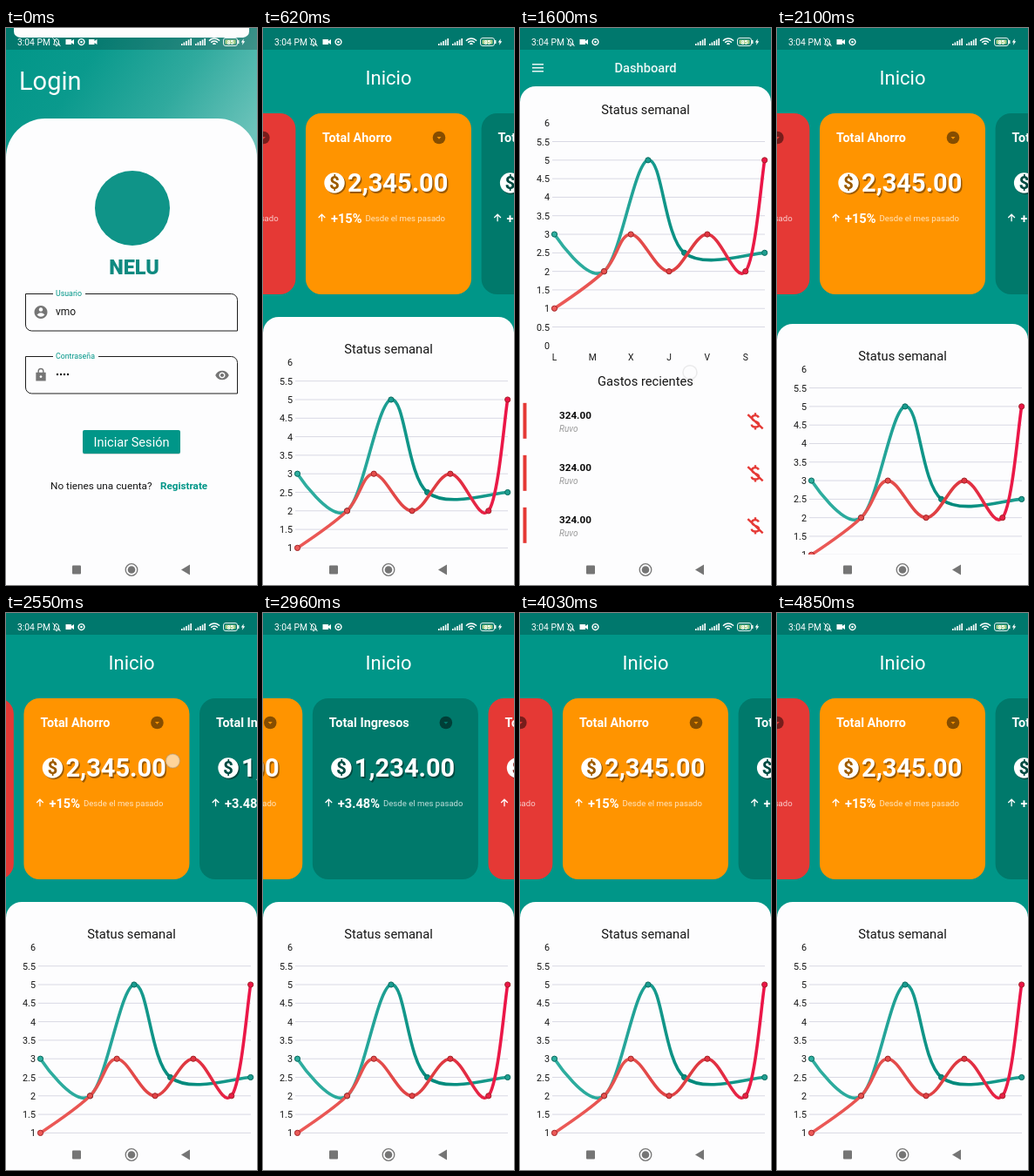
Write an HTML page with a canvas that moves like this. It is 288x640 px and loops after 4890 ms.

```html
<!DOCTYPE html>
<html lang="es">
<head>
<meta charset="utf-8">
<title>Control de gastos</title>
<style>
html, body { margin: 0; width: 100%; height: 100%; overflow: hidden; background: #fff; }
canvas { display: block; width: 288px; height: 640px; }
</style>
</head>
<body>
<canvas id="stage"></canvas>
<script>
const W = 288, H = 640, LOOP = 4890;
const TEAL = '#009688', DARK = '#00786d', RED = '#e53935';
const PAPER = '#fdfdfe', GREY = '#757575', INK = '#151515';
const canvas = document.getElementById('stage');
const ctx = canvas.getContext('2d');
const ratio = window.devicePixelRatio || 1;
canvas.width = W * ratio;
canvas.height = H * ratio;

const clamp = (v, lo = 0, hi = 1) => Math.min(hi, Math.max(lo, v));
const linear = p => p;
const easeOut = p => 1 - (1 - p) ** 2;

// Each key is [time, value, easing towards that value].
function track(keys, t) {
  if (t <= keys[0][0]) return keys[0][1];
  for (let i = 1; i < keys.length; i++) {
    const [t0, v0] = keys[i - 1], [t1, v1, ease = linear] = keys[i];
    if (t <= t1) return v0 + (v1 - v0) * ease((t - t0) / (t1 - t0));
  }
  return keys[keys.length - 1][1];
}

const ENTER = [[380, H], [620, 0, easeOut]];
const SCROLL = [[850, 0], [1000, 144], [1300, 276, easeOut], [1600, 276], [1800, 110],
  [2060, -14, easeOut], [2224, 0, easeOut]];
const PAGE = [[2500, 0], [2680, .5], [3070, 1, easeOut], [3100, 1], [3200, 1.5],
  [3390, 2, easeOut], [3400, 2], [3500, 2.36], [3850, 3, easeOut]];

// start, end, x and y from, x and y to
const TOUCHES = [
  [850, 1000, 200, 480, 200, 336],
  [1590, 1800, 195, 387, 195, 553],
  [2500, 2680, 220, 170, 119, 170],
  [3100, 3200, 215, 150, 114, 150],
  [3400, 3500, 202, 143, 130, 143]
];

const CARDS = [
  { title: 'Total Ahorro', amount: '2,345.00', change: '+15%', color: '#ff9400' },
  { title: 'Total Ingresos', amount: '1,234.00', change: '+3.48%', color: '#00796b' },
  { title: 'Total Gastos', amount: '987.56', change: '-3.48%', color: RED }
];

const LINES = [
  { points: [[0, 3], [1.3, 2], [2.45, 5], [3.4, 2.5], [5.5, 2.5]],
    colors: ['#2fae9f', '#26a69a', '#00897b', '#1f9f91'], edge: '#0b6b60' },
  { points: [[0, 1], [1.3, 2], [2, 3], [3, 2], [4, 3], [5, 2], [5.5, 5]],
    colors: ['#ec5a58', '#e5504d', '#de3b40', '#ec1448'], edge: '#a3262a' }
];

const ICONS = {
  account: 'M12 2a10 10 0 1 0 .01 0z M12 5a3 3 0 1 1-.01 0z M6 16q6-6 12 0q-6 6-12 0z',
  lock: 'M4 8h16v14h-16z M12 13a2 2 0 1 1-.01 0z M7 8V6a5 5 0 0 1 10 0v2h-2V6a3 3 0 0 0-6 0v2z',
  eye: 'M1 12C5 2 19 2 23 12C19 22 5 22 1 12z M12 7a5 5 0 1 1-.01 0z M12 9a3 3 0 1 1-.01 0z',
  noMoney: 'M16 7.5Q15 5 12 5Q8 5 8 8Q8 10.5 12 12Q16.3 13.3 16.3 16Q16.3 19 12 19Q8 19 7.5 16M12 2V5M12 19V22M3 4L21 21',
  up: 'M12 20V5M5 12L12 5L19 12',
  bell: 'M5 18H19L17 15V10Q16 5 12 5Q8 5 7 10V15L5 18M10 21H14M3 3L21 22',
  video: 'M2 6h13v4l6-4v12l-6-4v4h-13z',
  gear: 'M12 3a9 9 0 1 0 .01 0z M12 6a6 6 0 1 1-.01 0z M12 9a3 3 0 1 0 .01 0z',
  bolt: 'M14 2L6 13H11L9 22L18 10H13z'
};

function icon(name, x, y, size, color, stroke = 0) {
  const path = new Path2D(ICONS[name]);
  ctx.save();
  ctx.translate(x - size / 2, y - size / 2);
  ctx.scale(size / 24, size / 24);
  ctx.fillStyle = ctx.strokeStyle = color;
  ctx.lineWidth = stroke;
  if (stroke) ctx.stroke(path); else ctx.fill(path, 'evenodd');
  ctx.restore();
}

function text(str, x, y, size, color, weight = 400, align = 'left') {
  ctx.font = `${weight} ${size}px Roboto, sans-serif`;
  ctx.textAlign = align;
  ctx.fillStyle = color;
  ctx.fillText(str, x, y);
  return ctx.measureText(str).width;
}

function rect(x, y, w, h, color, radius = 0) {
  ctx.beginPath();
  ctx.roundRect(x, y, w, h, radius);
  ctx.fillStyle = color;
  ctx.fill();
}

function outline(x, y, w, h, color, radius) {
  ctx.beginPath();
  ctx.roundRect(x, y, w, h, radius);
  ctx.strokeStyle = color;
  ctx.lineWidth = 1;
  ctx.stroke();
}

function circle(x, y, r, fill, stroke, width = 1) {
  ctx.beginPath();
  ctx.arc(x, y, r, 0, Math.PI * 2);
  if (fill) { ctx.fillStyle = fill; ctx.fill(); }
  if (stroke) { ctx.strokeStyle = stroke; ctx.lineWidth = width; ctx.stroke(); }
}

function polygon(points, color) {
  ctx.beginPath();
  points.forEach(p => ctx.lineTo(...p));
  ctx.fillStyle = color;
  ctx.fill();
}

function segment(x0, y0, x1, y1, color, width = 1) {
  ctx.beginPath();
  ctx.moveTo(x0, y0);
  ctx.lineTo(x1, y1);
  ctx.strokeStyle = color;
  ctx.lineWidth = width;
  ctx.stroke();
}

function gradient(x0, y0, x1, y1, colors) {
  const g = ctx.createLinearGradient(x0, y0, x1, y1);
  colors.forEach((c, i) => g.addColorStop(i / (colors.length - 1), c));
  return g;
}

function statusBar(color, extraIcon) {
  rect(0, 0, W, 25, color);
  text('3:04 PM', 13, 20, 10.3, '#fff', 400);
  icon('bell', 58, 16, 12, '#fff', 2);
  icon('video', 73.5, 16, 12, '#fff');
  icon('gear', 86.5, 16, 11, '#fff');
  if (extraIcon) icon('video', 100, 16, 12, '#fff');
  for (const x of [201, 217])
    for (let i = 0; i < 5; i++) rect(x + i * 2.6, 18 - i * 1.5, 1.6, 2 + i * 1.5, '#fff');
  for (const r of [2, 5, 8]) {
    ctx.beginPath();
    ctx.arc(239, 20, r, -Math.PI * .77, -Math.PI * .23);
    ctx.strokeStyle = '#fff';
    ctx.lineWidth = 1.5;
    ctx.stroke();
  }
  outline(249.5, 11.5, 16, 9, '#e6f2ee', 2.5);
  rect(251.5, 13.5, 12, 5, '#a5cf8a', 1);
  rect(266, 14, 1.5, 4, '#e6f2ee');
  text('85', 257.5, 18.6, 6.5, '#fff', 700, 'center');
  icon('bolt', 272, 16, 9, '#fff');
}

function navigationBar() {
  rect(0, 605, W, 35, PAPER);
  rect(76, 617.5, 10, 10, GREY, 1);
  circle(144, 622.5, 6.8, null, GREY, 1.3);
  circle(144, 622.5, 4.3, GREY);
  polygon([[201, 622.5], [211, 616.5], [211, 628.5]], GREY);
}

function field(y, label, gapEnd, iconName) {
  outline(22.5, y + .5, 243, 42.5, '#1c1c1c', [0, 7, 0, 7]);
  rect(54, y - 2, gapEnd - 54, 5, PAPER);
  text(label, 57, y + 3, 8.8, TEAL);
  icon(iconName, 40, y + 21.5, iconName === 'lock' ? 17 : 18, GREY);
}

function login(t) {
  rect(0, 0, W, H, gradient(0, 0, 250, 170, [TEAL, '#0a9a8d', '#30aa9e', '#6cc3ba']));
  rect(0, 104, W, H, PAPER, [45, 45, 0, 0]);
  text('Login', 15, 71, 29, '#fff');

  circle(145, 207, 43, '#0f9488');
  text('NELU', 147, 283, 23.5, '#0f8a80', 900, 'center');

  field(305, 'Usuario', 91, 'account');
  text('vmo', 57, 330, 12, INK);
  field(377, 'Contraseña', 106, 'lock');
  for (let i = 0; i < 4; i++) circle(59 + i * 4, 398, 1.2, INK);
  icon('eye', 248, 399, 17, GREY);

  rect(88, 463, 112, 27, 'rgba(0,0,0,.15)', 2);
  rect(88, 462, 112, 27, TEAL, 2);
  text('Iniciar Sesión', 144, 481, 14.6, '#fff', 400, 'center');
  text('No tienes una cuenta?', 51, 530, 11.8, INK);
  text('Registrate', 177, 530, 11.7, TEAL, 700);

  navigationBar();
  statusBar('rgba(0,0,0,.2)', true);
  rect(9, -20 - 12 * clamp(t / 120), 270, 31, '#fdfdfd', 7);
}

function card({ title, amount, change, color }, x) {
  rect(x, 98, 190, 208, color, 18);
  text(title, x + 19, 131, 14.4, '#fff', 700);
  circle(x + 153, 126, 7.3, 'rgba(0,0,0,.48)');
  polygon([[x + 150.5, 125], [x + 155.5, 125], [x + 153, 127.7]], color);

  const shade = 'rgba(0,0,0,.4)';
  circle(x + 34.5, 179.5, 11.7, shade);
  circle(x + 33, 178, 11.7, '#fff');
  for (const paint of [color, shade]) text('$', x + 33, 185, 20, paint, 700, 'center');
  text(amount, x + 49.5, 189.7, 29, shade, 700);
  text(amount, x + 48, 188, 29, '#fff', 700);

  icon('up', x + 18.5, 218, 13, '#fff', 2.4);
  const width = text(change, x + 29, 224, 14.6, '#fff', 700);
  text('Desde el mes pasado', x + 33 + width, 222, 9.6, 'rgba(255,255,255,.75)');
}

function carousel(page) {
  const first = Math.floor(page) - 1;
  for (let i = first; i < first + 4; i++)
    card(CARDS[(i + 3) % 3], 49 + (i - page) * 201.6);
}

function chart(top) {
  const px = v => 39.5 + v * 43.85;
  const py = v => top + 308 - v * 42.6;
  for (let v = 0; v <= 6; v += .5) {
    if (v > 0 && v < 6) segment(37, py(v), 281, py(v), '#d9d9e4');
    text(String(v), 34, py(v) + 4, 10.8, INK, 400, 'right');
  }
  [...'LMXJVS'].forEach((day, i) => text(day, px(i), top + 325, 10.3, INK, 400, 'center'));

  for (const { points, colors, edge } of LINES) {
    const pts = points.map(([x, y]) => [px(x), py(y)]);
    const paint = gradient(px(0), 0, px(5.5), 0, colors);
    ctx.beginPath();
    ctx.moveTo(...pts[0]);
    let dx = 0, dy = 0;
    for (let i = 1; i < pts.length; i++) {
      const [ax, ay] = pts[i - 1], [x, y] = pts[i], [nx, ny] = pts[i + 1] || pts[i];
      const c1 = [ax + dx, ay + dy];
      dx = (nx - ax) * .175;
      dy = (ny - ay) * .175;
      ctx.bezierCurveTo(...c1, x - dx, y - dy, x, y);
    }
    ctx.strokeStyle = paint;
    ctx.lineWidth = 3.6;
    ctx.lineCap = 'round';
    ctx.stroke();
    ctx.lineCap = 'butt';
    for (const [x, y] of pts) circle(x, y, 3.1, paint, edge, 1);
  }
}

function expenses(top) {
  text('Gastos recientes', 144, top + 354, 14.7, INK, 400, 'center');
  for (let i = 0; i < 3; i++) {
    const y = top + i * 60;
    rect(3.5, y + 374, 4, 41, RED);
    text('324.00', 45, y + 392, 11.7, '#0c0c0c', 700);
    text('Ruvo', 45, y + 407, 10, '#9a9a9a', 'italic 400');
    icon('noMoney', 270, y + 395, 23, RED, 2.5);
  }
}

function home(t) {
  const scroll = track(SCROLL, t);
  const collapse = clamp(scroll / 265);
  const fade = clamp((collapse - .84) / .16);
  const top = 332 - scroll;
  const sheetTop = Math.max(67, top);

  rect(0, 0, W, H, TEAL);
  if (fade < 1) {
    ctx.save();
    ctx.translate(0, -66 * collapse);
    text('Inicio', 144, 65, 22, '#fff', 400, 'center');
    carousel(track(PAGE, t));
    ctx.restore();
    ctx.globalAlpha = fade;
    rect(0, 0, W, H, TEAL);
    ctx.globalAlpha = 1;
  }

  ctx.globalAlpha = clamp((scroll - 265) / 11);
  text('Dashboard', 144, 51, 14.7, '#fff', 500, 'center');
  for (const y of [41, 45, 49]) rect(14, y, 13, 1.5, '#fff');
  ctx.globalAlpha = 1;

  rect(0, sheetTop, W, H, PAPER, [18, 18, 0, 0]);
  if (fade > 0 && fade < 1) segment(0, sheetTop + 13.5, W, sheetTop + 13.5, '#c9c9cc');
  text('Status semanal', 144, top + 42, 14.7, INK, 400, 'center');
  chart(top);
  expenses(top);
  navigationBar();
  statusBar(DARK, false);
}

function touches(t) {
  for (const [start, end, x0, y0, x1, y1] of TOUCHES) {
    if (t < start || t > end) continue;
    const p = (t - start) / (end - start);
    ctx.globalAlpha = clamp((t - start) / 25);
    circle(x0 + (x1 - x0) * p, y0 + (y1 - y0) * p, 8, 'rgba(255,255,255,.6)', 'rgba(150,150,150,.4)', 1.5);
    ctx.globalAlpha = 1;
  }
}

function draw(t) {
  ctx.setTransform(ratio, 0, 0, ratio, 0, 0);
  const offset = track(ENTER, t);
  if (offset > 0) login(t);
  if (offset < H) {
    ctx.save();
    ctx.translate(0, offset);
    home(t);
    ctx.restore();
  }
  touches(t);
}

const began = performance.now();
function tick() {
  draw((performance.now() - began) % LOOP);
  requestAnimationFrame(tick);
}
tick();
</script>
</body>
</html>
```
